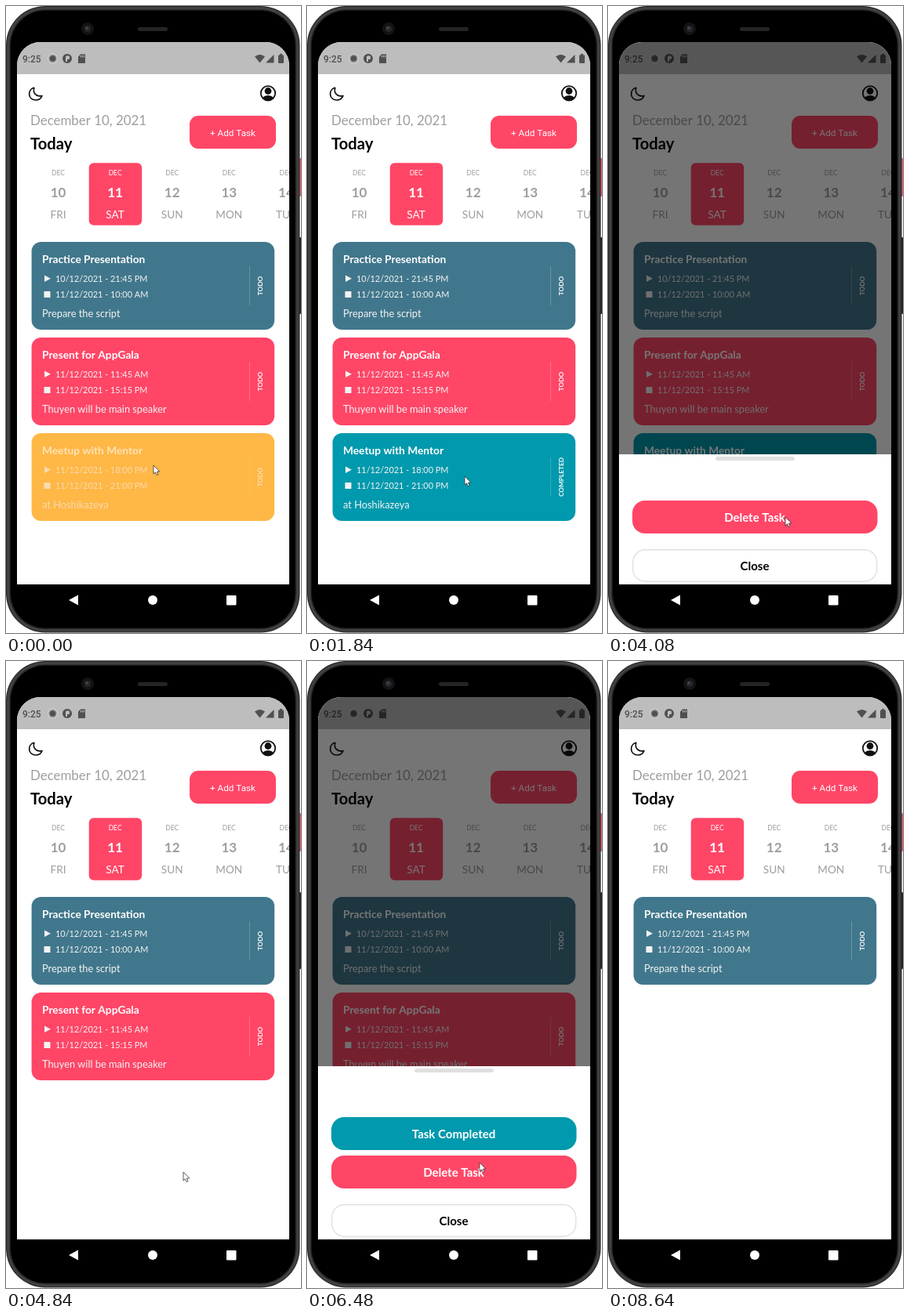
Write an HTML page with a canvas that moves like this. It is 376 by 800 pixels and loops after 8880 ms.

```html
<!DOCTYPE html>
<html lang="en">
<head>
<meta charset="utf-8">
<title>Task planner</title>
<style>
  html, body { margin: 0; width: 100%; height: 100%; overflow: hidden; background: #fff; }
  canvas { display: block; width: 376px; height: 800px; }
</style>
</head>
<body>
<canvas id="stage"></canvas>
<script>
const W = 376, H = 800, LOOP = 8880;
const RED = '#ff4667', TEAL = '#0099ad', BLUE = '#41778c', YELLOW = '#ffb746';
const GREY = '#9e9e9e', PALE = '#f3f3f3';
const SCREEN = { x: 14, y: 46, w: 347, bottom: 738 };

const canvas = document.getElementById('stage');
const ctx = canvas.getContext('2d');
const ratio = window.devicePixelRatio || 1;
canvas.width = W * ratio;
canvas.height = H * ratio;

const OPEN_MS = 380, CLOSE_MS = 320;
const sheets = [
  { open: 350, close: 1440, height: 221, full: true },
  { open: 2972, close: 4280, height: 166, full: false },
  { open: 5960, close: 6720, height: 221, full: true }
];

const cards = [
  { title: 'Practice Presentation', from: '10/12/2021 - 21:45 PM', to: '11/12/2021 - 10:00 AM',
    note: 'Prepare the script', color: BLUE, until: LOOP },
  { title: 'Present for AppGala', from: '11/12/2021 - 11:45 AM', to: '11/12/2021 - 15:15 PM',
    note: 'Thuyen will be main speaker', color: RED, until: 6800 },
  { title: 'Meetup with Mentor', from: '11/12/2021 - 18:00 PM', to: '11/12/2021 - 21:00 PM',
    note: 'at Hoshikazeya', color: YELLOW, until: 4360, done: 1500, fadeIn: true }
];

// time, x, y of the pointer tip
const pointerPath = [
  [0, 188, 586], [920, 188, 586], [1280, 201, 600], [2900, 201, 600],
  [3060, 202, 602], [3400, 202, 602], [4000, 226, 652], [4860, 226, 652],
  [5500, 216, 492], [6040, 216, 492], [6420, 220, 640], [7560, 220, 640],
  [8400, 232, 762], [8640, 236, 804]
];

const clamp = v => Math.max(0, Math.min(1, v));
const decelerate = v => 1 - Math.pow(1 - clamp(v), 2.7);
const smooth = v => v * v * (3 - 2 * v);

function box(x, y, w, h, r, fill, stroke, line = 1) {
  ctx.beginPath();
  ctx.roundRect(x, y, w, h, r);
  if (fill) { ctx.fillStyle = fill; ctx.fill(); }
  if (stroke) { ctx.strokeStyle = stroke; ctx.lineWidth = line; ctx.stroke(); }
}

function disc(x, y, r, fill) {
  ctx.beginPath();
  ctx.arc(x, y, r, 0, Math.PI * 2);
  ctx.fillStyle = fill;
  ctx.fill();
}

function poly(points, fill) {
  ctx.beginPath();
  points.forEach(([x, y]) => ctx.lineTo(x, y));
  ctx.closePath();
  ctx.fillStyle = fill;
  ctx.fill();
}

function text(str, x, y, size, color, weight = 400, align = 'left', family = 'Lato') {
  ctx.font = `${weight} ${size}px ${family}, sans-serif`;
  ctx.textAlign = align;
  ctx.fillStyle = color;
  ctx.fillText(str, x, y);
}

function drawPhone() {
  box(371, 194, 5, 49, 1, '#e8616a');
  box(371, 295, 5, 98, 1, '#222');
  // metal rim: dark edge, soft highlight, then black glass
  for (let i = 0; i <= 6; i++) {
    const v = Math.round(68 * Math.sin(Math.PI * (i + 1.5) / 7.5));
    box(i, i, 374.5 - 2 * i, 799.5 - 2 * i, 50 - i, `rgb(${v},${v},${v})`);
  }
  disc(104, 29, 8, '#131313');
  disc(104, 29, 4, '#25282c');
  disc(103, 28, 1.5, '#4a4d52');
  box(168, 27, 38, 5, 2.5, '#242424');
}

function drawNav() {
  poly([[80, 758], [92, 751.5], [92, 764.5]], '#fff');
  disc(187, 758, 6, '#fff');
  box(281, 752, 12.5, 12.5, 1, '#fff');
}

function drawStatus() {
  const ink = '#505050';
  ctx.fillStyle = '#bdbdbd';
  ctx.fillRect(14, 46, 347, 41);
  text('9:25', 21, 71.5, 12, ink, 500, 'left', 'Roboto');
  disc(59.5, 67, 6.5, '#d2d2d2');
  disc(59.5, 67, 5.2, '#8c8c8c');
  disc(59.5, 67, 3.6, ink);
  disc(78, 67, 6, ink);
  box(76, 63.5, 5, 4.5, 1.5, '#bdbdbd');
  box(76, 66, 2, 5, 0, '#bdbdbd');
  poly([[92, 65], [95, 61.5], [101, 61.5], [101, 73], [92, 73]], ink);
  ctx.fillStyle = '#bdbdbd';
  for (let i = 0; i < 3; i++) ctx.fillRect(95 + i * 2, 63, 1, 2.5);
  ctx.beginPath();
  ctx.moveTo(323.5, 72.5);
  ctx.lineTo(317, 64.5);
  ctx.quadraticCurveTo(323.5, 59.5, 330, 64.5);
  ctx.closePath();
  ctx.fillStyle = ink;
  ctx.fill();
  poly([[331, 72.5], [341.5, 72.5], [341.5, 62]], ink);
  box(347, 62.5, 7, 10.5, 1, ink);
  ctx.fillRect(349, 61, 3, 2);
}

function drawHeader() {
  ctx.strokeStyle = '#111';
  ctx.lineWidth = 1.7;
  ctx.lineJoin = 'round';
  ctx.beginPath();
  ctx.moveTo(36, 104);
  ctx.bezierCurveTo(26.5, 107, 28, 120, 38, 120);
  ctx.bezierCurveTo(42, 120, 45, 117.5, 46, 114.5);
  ctx.bezierCurveTo(39, 116.5, 33.5, 111, 36, 104);
  ctx.stroke();

  ctx.save();
  ctx.beginPath();
  ctx.arc(334, 111.3, 9.2, 0, Math.PI * 2);
  ctx.lineWidth = 1.8;
  ctx.stroke();
  ctx.clip();
  disc(334, 108.5, 4.4, '#111');
  ctx.beginPath();
  ctx.ellipse(334, 119.5, 7.5, 5.5, 0, 0, Math.PI * 2);
  ctx.fill();
  ctx.restore();

  text('December 10, 2021', 31, 152, 16.9, GREY);
  text('Today', 31, 183, 20.2, '#000', 700);
  box(234, 140, 110, 42, 11, RED);
  text('+ Add Task', 289, 165.5, 11.7, '#fff', 400, 'center', 'Roboto');
}

function drawDates() {
  ['FRI', 'SAT', 'SUN', 'MON', 'TUE'].forEach((day, i) => {
    const x = 66.5 + i * 72.6, on = i === 1, ink = on ? '#fff' : GREY;
    if (on) box(105.7, 200.3, 67.5, 79.4, 6, RED);
    text('DEC', x, 215.5, 8.5, ink, 400, 'center');
    text(10 + i, x, 244, 17, ink, 700, 'center');
    text(day, x, 270.5, 13.6, ink, 400, 'center');
  });
}

function drawCard(card, i, t) {
  if (t >= card.until) return;
  const done = card.done && t >= card.done;
  ctx.save();
  ctx.translate(33, 301 + i * 122);
  box(-0.4, 0, 309.6, 112, 12, done ? TEAL : card.color);
  if (card.fadeIn) ctx.globalAlpha = 0.6 + 0.4 * clamp(t / 160);
  text(card.title, 13, 27, 13.75, '#fff', 700);
  poly([[16, 42.5], [24, 46.7], [16, 51]], PALE);
  box(15.5, 63, 8, 8, 0.5, PALE);
  text(card.from, 30, 51, 10.9, PALE);
  text(card.to, 30, 71, 10.9, PALE);
  text(card.note, 13, 96, 12.8, PALE);
  ctx.fillStyle = 'rgba(238,238,238,.35)';
  ctx.fillRect(277, 31, 0.7, 50);
  ctx.translate(294, 56);
  ctx.rotate(-Math.PI / 2);
  text(done ? 'COMPLETED' : 'TODO', 0, 0, 8.3, '#fff', 700, 'center');
  ctx.restore();
}

function drawButton(label, y, fill, ink, border) {
  if (border) box(31.7, y + 0.7, 311, 40.6, 16, fill, border, 1.4);
  else box(31, y, 312.5, 42, 16, fill);
  text(label, 187, y + 26.5, 15, ink, 700, 'center');
}

function drawSheet(t) {
  const sheet = sheets.find(s => t > s.open && t < s.close + CLOSE_MS);
  if (!sheet) return;
  const raw = t < sheet.close
    ? clamp((t - sheet.open) / OPEN_MS)
    : 1 - (t - sheet.close) / CLOSE_MS;
  const shown = decelerate(raw);
  // the backdrop is dark well before the sheet settles
  ctx.fillStyle = `rgba(0,0,0,${0.54 * smooth(clamp(raw * 2.6))})`;
  ctx.fillRect(SCREEN.x, SCREEN.y, SCREEN.w, SCREEN.bottom - SCREEN.y);

  ctx.save();
  ctx.translate(0, sheet.height * (1 - shown));
  const top = SCREEN.bottom - sheet.height;
  ctx.fillStyle = '#fff';
  ctx.fillRect(SCREEN.x, top, SCREEN.w, sheet.height);
  box(137, top + 3, 101, 5, 2.5, '#e0e0e0');
  if (sheet.full) drawButton('Task Completed', 582, TEAL, '#fff');
  drawButton('Delete Task', 631, RED, '#fff');
  drawButton('Close', 693, '#fff', '#000', '#e0e0e0');
  ctx.restore();
}

function drawPointer(t) {
  const next = pointerPath.findIndex(k => k[0] > t);
  if (next < 1) return;
  const [t0, x0, y0] = pointerPath[next - 1], [t1, x1, y1] = pointerPath[next];
  const k = smooth((t - t0) / (t1 - t0));
  ctx.save();
  ctx.translate(x0 + (x1 - x0) * k, y0 + (y1 - y0) * k);
  poly([[0, 0], [0, 11], [2.5, 8.8], [4.2, 12.6], [6, 11.8], [4.4, 8.1], [7.8, 8]], '#fff');
  ctx.strokeStyle = '#333';
  ctx.lineWidth = 0.8;
  ctx.stroke();
  ctx.restore();
}

function draw(t) {
  ctx.setTransform(ratio, 0, 0, ratio, 0, 0);
  ctx.fillStyle = '#fff';
  ctx.fillRect(0, 0, W, H);
  drawPhone();
  ctx.save();
  ctx.beginPath();
  ctx.roundRect(SCREEN.x, SCREEN.y, SCREEN.w, SCREEN.bottom - SCREEN.y, [30, 30, 0, 0]);
  ctx.clip();
  ctx.fillStyle = '#fff';
  ctx.fillRect(SCREEN.x, SCREEN.y, SCREEN.w, SCREEN.bottom - SCREEN.y);
  drawStatus();
  drawHeader();
  drawDates();
  cards.forEach((card, i) => drawCard(card, i, t));
  drawSheet(t);
  ctx.restore();
  drawNav();
  drawPointer(t);
}

const start = performance.now();
function tick() {
  draw((performance.now() - start) % LOOP);
  requestAnimationFrame(tick);
}
tick();
</script>
</body>
</html>
```
